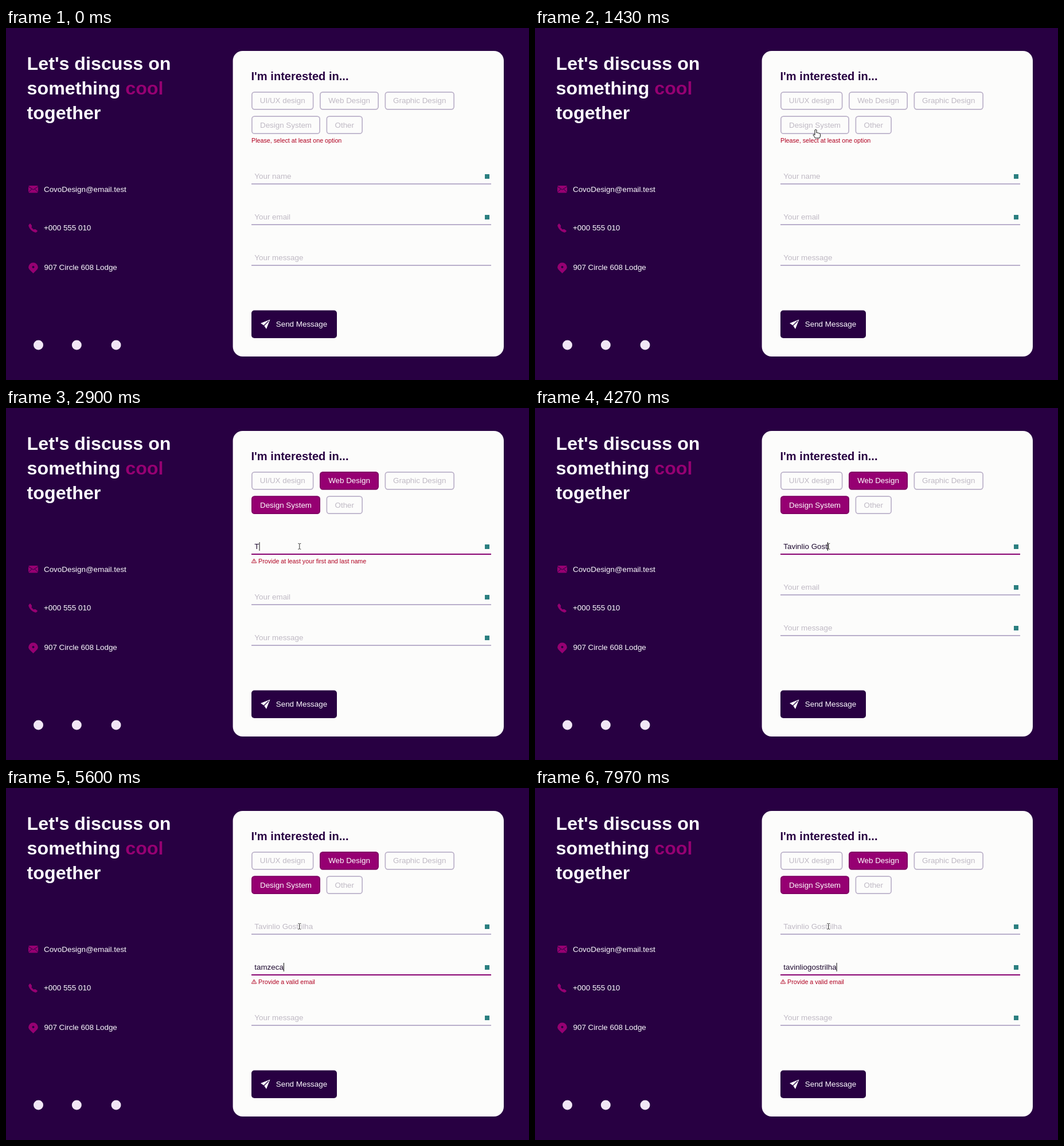
An HTML page for the animation above (8000 ms loop, 912x614 px).

```html
<!DOCTYPE html>
<html lang="en">
<head>
<meta charset="utf-8">
<title>Contact form</title>
<style>
  html, body { margin: 0; width: 100%; height: 100%; overflow: hidden; background: #280042; }
  svg { display: block; width: 100vw; height: 100vh; }
  text { font: 13.4px "Liberation Sans", Arial, sans-serif; white-space: pre; }
  .title { font-size: 32.2px; font-weight: bold; }
  .subtitle { font-size: 20.1px; font-weight: bold; }
  .error text { font-size: 10.72px; fill: #b00020; }
  .light { fill: #fdfbff; }
  .dark { fill: #280042; }
  .accent { fill: #960072; }
  .chip rect { fill: none; stroke: #bbb1c9; stroke-width: 1.7; }
  .chip text { fill: #bfb9c4; text-anchor: middle; }
  .chip.on rect { fill: #960072; stroke: #7d0063; }
  .chip.on text { fill: #fff; }
  .field .value { fill: #bfb9c4; }
  .field .line { fill: #b9afcb; }
  .field.filled.focus .value { fill: #1e0a30; }
  .field.focus .line { fill: #870070; }
</style>
</head>
<body>
<svg id="stage" viewBox="0 0 912 614">
  <rect class="dark" width="912" height="614"/>
  <g class="light">
    <text class="title" x="36.6" y="72.5">Let's discuss on</text>
    <text class="title" x="36.6" y="115.5">something <tspan class="accent">cool</tspan></text>
    <text class="title" x="36.6" y="158.5">together</text>
    <text x="66" y="285.5">CovoDesign@email.test</text>
    <text x="66" y="353">+000 555 010</text>
    <text x="66.5" y="421.5">907 Circle 608 Lodge</text>
  </g>
  <g class="accent">
    <rect x="39" y="275" width="17" height="12.5" rx="2"/>
    <path d="M39 276.5L47.5 282L56 276.5M39 286.5L45 281M56 286.5L50 281" fill="none" stroke="#280042"/>
    <path transform="translate(39 341)" d="M3.7.5L6 3.5Q6.2 4.2 6 5L5.5 7L9 10.5L11 10Q12 9.8 12.6 10.2L15.4 12.3Q16.3 13 15.6 13.8L14 15.3Q13 16 11.5 15.6Q7.500 14.300 4.500 11.300Q1.600 8.400.4 4.500Q0 3 1 2L2.400.6Q3 0 3.700.5Z"/>
    <path d="M47.500 428L41.500 422Q39.200 419.500 39.200 417.300A8.300 8 0 0 1 55.800 417.300Q55.800 419.500 53.500 422Z"/>
    <circle class="dark" cx="47.500" cy="417" r="2"/>
  </g>
  <g fill="#f1e6f5">
    <circle cx="56.500" cy="553" r="8.500"/>
    <circle cx="123.300" cy="553" r="8.500"/>
    <circle cx="192" cy="553" r="8.500"/>
  </g>
  <rect x="395.600" y="40" width="472.400" height="533" rx="17" fill="#fcfcfb"/>
  <text class="subtitle dark" x="427.500" y="90.500">I'm interested in...</text>
  <g id="chips"></g>
  <g class="error" id="chipError"><text x="428" y="200">Please, select at least one option</text></g>
  <g id="fields"></g>
  <rect class="dark" x="428" y="492.500" width="149" height="48.500" rx="5"/>
  <g transform="translate(444 508.500)">
    <path class="light" d="M0 6.600L16.500 0L10 16.500L5.900 10.600Z"/>
    <path d="M5.500 11L14 2.500" stroke="#280042" stroke-width="1.200"/>
  </g>
  <text class="light" x="470.800" y="521">Send Message</text>
  <g id="pointer" stroke-linejoin="round">
    <path id="arrow" d="M0 0V14L3.300 11L5.500 16L7.700 15L5.500 10.200H10Z" fill="#fff" stroke="#111"/>
    <path id="hand" d="M-1.500 1Q0-1 1.500 1V6Q3 4.800 4 6.300Q5.500 5.500 6.300 7Q8 6.500 8 8.500V11Q8 13 6.500 15H-1Q-2 12.500-4.500 9.500Q-4.500 7.500-1.500 9.500Z" fill="#fff" stroke="#111"/>
    <path id="beam" d="M-2.500-5Q-.5-5 0-4Q.5-5 2.500-5M0-4V4M-2.500 5Q-.5 5 0 4Q.5 5 2.500 5" fill="none" stroke="#333"/>
  </g>
</svg>
<script>
const LOOP = 8000, SHIFT = 17;
const PERSON = 'Tavinlio Gostrilha', TYPO = 'tamzeca', LOGIN = 'tavinliogostrilha';
const $ = id => document.getElementById(id);
const clamp = (v, min, max) => Math.min(max, Math.max(min, v));

const chips = [
  { label: 'UI/UX design', x: 428, y: 111, w: 108.5 },
  { label: 'Web Design', x: 547, y: 111, w: 103, picked: 2050 },
  { label: 'Graphic Design', x: 660.5, y: 111, w: 121.5 },
  { label: 'Design System', x: 428, y: 153.3, w: 120, picked: 1560 },
  { label: 'Other', x: 558.5, y: 153.3, w: 63.5 },
];
$('chips').innerHTML = chips.map(c => `<g class="chip">
  <rect x="${c.x + .85}" y="${c.y + .85}" width="${c.w - 1.7}" height="30" rx="4.5"/>
  <text x="${c.x + c.w / 2}" y="${c.y + 20.3}">${c.label}</text></g>`).join('');
chips.forEach((c, i) => c.el = $('chips').children[i]);

// Each field is drawn around its underline at y = 0.
const fields = [
  ['Your name', 'Provide at least your first and last name'],
  ['Your email', 'Provide a valid email'],
  ['Your message', ''],
].map(([hint, warning]) => ({ hint, warning }));
$('fields').innerHTML = fields.map(f => `<g class="field">
  <rect class="line" x="428" y="-1" width="418" height="2"/>
  <text class="value" x="433.3" y="-9.5"></text>
  <rect class="caret" y="-21" width="1" height="15" fill="#111"/>
  <rect class="badge" x="835" y="-17" width="8" height="8" fill="#2b7f80"/>
  <g class="error">
    <path d="M432.500 8L436.700 15H428.300ZM432.500 10.300V12.700M432.500 13.300V14.200" fill="none" stroke="#b00020" stroke-width=".9"/>
    <text x="440" y="15.500">${f.warning}</text>
  </g></g>`).join('');
fields.forEach((f, i) => {
  f.el = $('fields').children[i];
  for (const part of ['value', 'caret', 'badge', 'error']) f[part] = f.el.querySelector('.' + part);
});

const show = (el, on) => el.style.display = on ? '' : 'none';
const typed = (word, start, gap, t) =>
  word.slice(0, clamp(Math.floor((t - start) / gap) + 1, 0, word.length));

function emailAt(t) {
  if (t < 5650) return typed(TYPO, 5080, 80, t);
  if (t < 6450) return TYPO.slice(0, Math.max(1, 6 - Math.floor((t - 5650) / 35)));
  return LOGIN[0] + typed(LOGIN.slice(1), 6450, 98, t);
}

// time, x, y
const path = [
  [600, 640, 620], [1250, 489.5, 177], [1680, 489.5, 177],
  [1930, 590, 131], [2150, 590, 131], [2400, 511.8, 241.3],
];
function pointerAt(t) {
  const next = path.findIndex(p => p[0] > t);
  if (next < 0) return path[path.length - 1].slice(1);
  if (next === 0) return path[0].slice(1);
  const [t0, x0, y0] = path[next - 1], [t1, x1, y1] = path[next];
  const k = (t - t0) / (t1 - t0), ease = k * k * (3 - 2 * k);
  return [x0 + (x1 - x0) * ease, y0 + (y1 - y0) * ease];
}

function drawPointer(t, lines) {
  const [x, y] = pointerAt(t);
  const within = (left, top, w, h) => x >= left && x <= left + w && y >= top && y <= top + h;
  const hand = within(428, 492.5, 149, 48.5) || chips.some(c => within(c.x, c.y, c.w, 31.7));
  const beam = lines.some(line => within(428, line - 30, 418, 30));
  $('pointer').setAttribute('transform', `translate(${x} ${y})`);
  show($('hand'), hand);
  show($('beam'), beam);
  show($('arrow'), !hand && !beam);
}

function draw(t) {
  const values = [typed(PERSON, 2800, 114, t), emailAt(t), ''];
  const errors = [values[0].length > 0 && values[0].length < 10, values[1].length > 0, false];
  const focus = t < 2480 ? -1 : t < 4950 ? 0 : 1;
  const caretOn = t < 6325 || t >= 6450;
  const noChip = t < 1560;

  chips.forEach(c => c.el.classList.toggle('on', t >= c.picked));
  show($('chipError'), noChip);

  let offset = noChip ? SHIFT : 0;
  const lines = fields.map((f, i) => {
    const line = 255 + 71 * i + offset, active = i === focus;
    f.el.setAttribute('transform', `translate(0 ${line})`);
    f.el.classList.toggle('filled', values[i] !== '');
    f.el.classList.toggle('focus', active);
    f.value.textContent = values[i] || f.hint;
    show(f.caret, active && caretOn);
    if (active) f.caret.setAttribute('x', 433.3 + (values[i] ? f.value.getComputedTextLength() : 0));
    show(f.badge, i < 2 || focus >= 0);
    show(f.error, errors[i]);
    if (errors[i]) offset += SHIFT;
    return line;
  });
  drawPointer(t, lines);
}

const start = performance.now();
function tick() {
  draw((performance.now() - start) % LOOP);
  requestAnimationFrame(tick);
}
tick();
</script>
</body>
</html>
```
